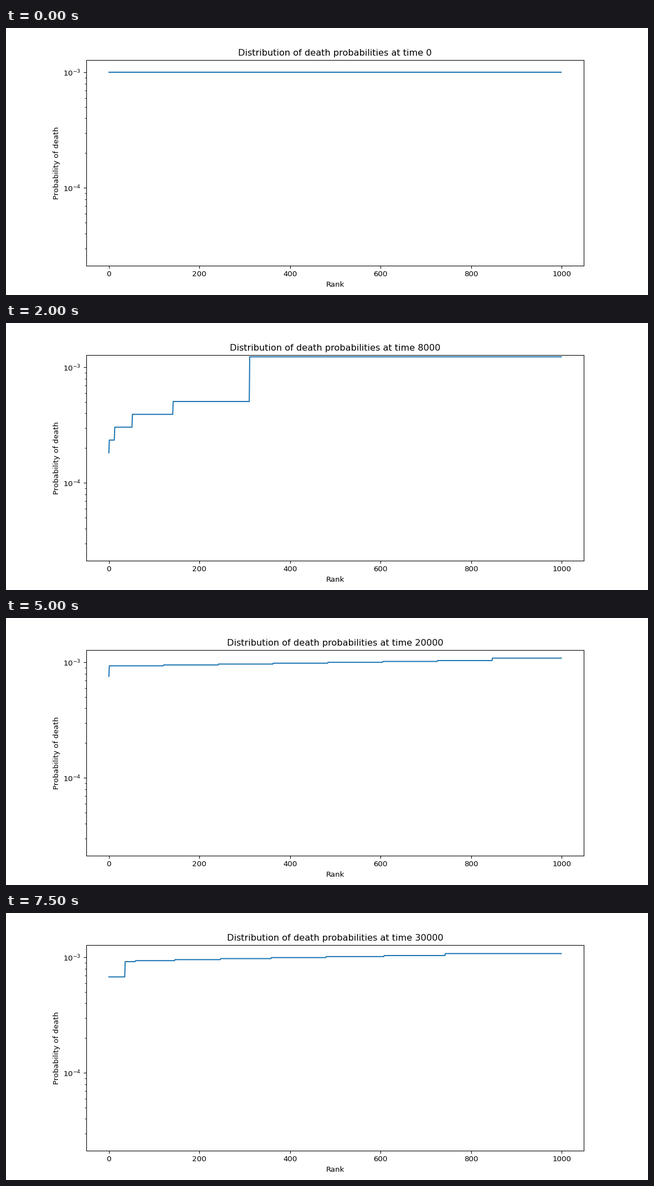
A matplotlib script that plays this animation: 1159 px wide and 483 px high, repeating every 8 s.

```python
import numpy as np
import matplotlib.pyplot as plt
from matplotlib.animation import FuncAnimation

HEIGHT, DPI = 483, 96.6
SIZE = 1000
STEP = 2000
FRAMES = 16
BASE_Y, DECADE = 80.3, 209.0  # pixel row of 1e-3 and pixels per decade

# The sorted curve climbs in stairs from low to high, then reaches a plateau.
KEY_STEPS = (2, 4, 6, 7, 10, 13, 15)
KEYS = {
    "start": (13, 311, 708, 740, 847, 749, 743),
    "top": (79.2, 61.2, 63.1, 73, 72.6, 75.6, 73.4),
    "low": (429, 235, 120, 90, 86.5, 88, 88),
    "high": (113, 142, 74, 77, 77, 77, 77),
    "power": (0.5, 3.5, 1.6, 1, 1, 1.3, 1.3),
}


def prob(y):
    """Probability drawn at pixel row y."""
    return 10 ** (-3 - (y - BASE_Y) / DECADE)


def distribution(k):
    rows = np.full(SIZE, BASE_Y)
    if k >= 2:
        key = {name: np.interp(k, KEY_STEPS, v) for name, v in KEYS.items()}
        count = min(k + 1, 7)
        u = np.arange(count) / count
        ranks = np.round(key["start"] * u ** key["power"]).astype(int)
        for rank, y in zip(ranks, np.linspace(key["low"], key["high"], count)):
            rows[rank:] = y
        rows[round(key["start"]):] = key["top"]
    if k >= 10:
        # A fitter group appears and widens while its lead rises and fades.
        rows[:7 * (k - 10) + 1] = 142 - 5 * (k - 12.7) ** 2
    return prob(rows)


fig, ax = plt.subplots(figsize=(12, 5), dpi=DPI)
line, = ax.plot(np.arange(SIZE), distribution(0))
ax.set_yscale("log")
ax.set_ylim(prob(HEIGHT * 0.89), prob(HEIGHT * 0.12))
ax.set_xlabel("Rank")
ax.set_ylabel("Probability of death")
title = ax.set_title("")


def update(k):
    line.set_ydata(distribution(k))
    title.set_text(f"Distribution of death probabilities at time {k * STEP}")
    return line, title


anim = FuncAnimation(fig, update, frames=FRAMES, interval=500, repeat=True)
plt.show()
```
